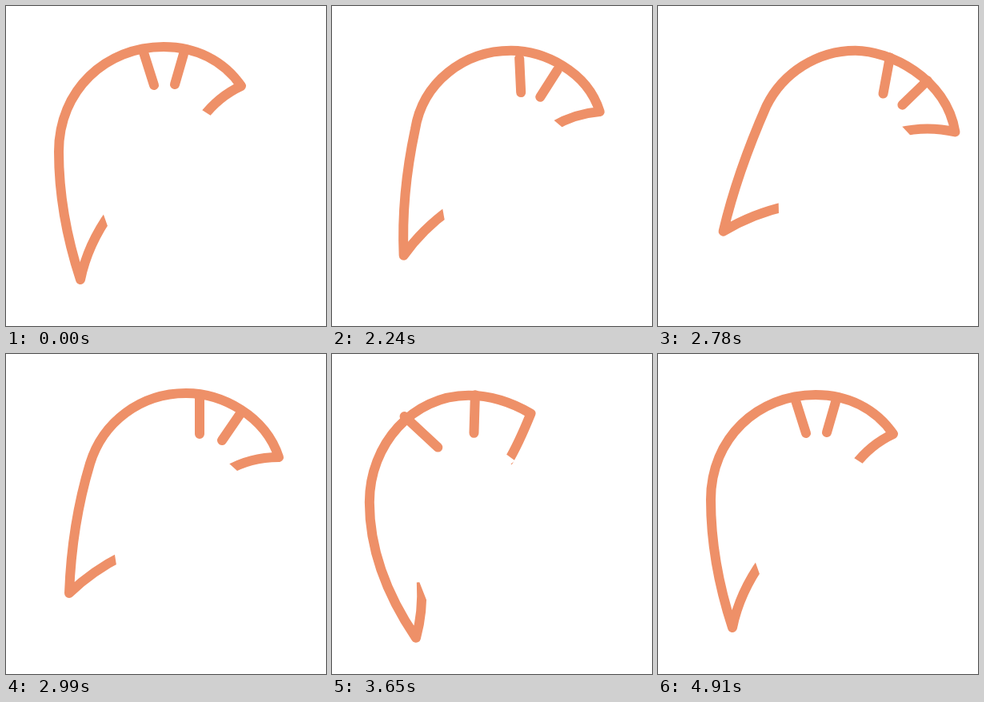
These frames come from a looping animation (400 px wide and 400 px high, 5030 ms). An HTML page with a canvas:

```html
<!DOCTYPE html>
<html lang="en">
<head>
<meta charset="utf-8">
<title>Swinging crest</title>
<style>
  html, body { margin: 0; width: 100%; height: 100%; overflow: hidden; background: #fff; }
  canvas { display: block; }
</style>
</head>
<body>
<canvas id="stage" width="400" height="400"></canvas>
<script>
const ctx = document.getElementById('stage').getContext('2d');
const LOOP = 5030, START = 2030, STEP = 30;

// Each pose: outer curve (10 points), front edge (2), back edge (2),
// two ridges (4), front cut (2), back cut (2).
const rest = [
  93,342, 76,290, 66,235, 66,182, 66,105, 125,51, 197,51, 237,51, 272,68, 294,100,
  266,113, 246,139, 102,298, 131,258,
  172,58, 185,99, 222,60, 211,98,
  245,130, 256,137, 122,261, 127,275];
const forward = [
  86,279, 100,230, 122,175, 145,125, 165,85, 208,61, 253,61, 292,61, 370,94, 379,167,
  345,158, 309,163, 125,258, 166,250,
  302,74, 292,118, 347,102, 314,131,
  313,157, 323,168, 156,246, 156,260];
const halfway = [
  79,299, 81,245, 89,190, 105,137, 121,85, 168,49, 225,49, 270,49, 324,77, 341,129,
  305,129, 276,146, 108,271, 146,252,
  242,54, 242,100, 294,73, 270,108,
  279,137, 289,146, 136,251, 138,264];
const back = [
  98,344, 72,290, 58,235, 58,180, 58,105, 115,48, 186,48, 222,48, 253,62, 275,86,
  252,110, 235,134, 107,305, 123,266,
  138,63, 163,103, 204,53, 197,95,
  234,125, 243,131, 116,266, 122,282];

const mix = (a, b, k, dy = 0) => a.map((v, i) => v + (b[i] - v) * k + (i % 2) * dy);

const keys = [
  [2000, rest],
  [2450, forward],
  [2560, mix(rest, forward, 1.09)],
  [2990, halfway],
  [3230, back],
  [3635, mix(rest, back, 2.4, 8)],
  [4040, mix(rest, back, 0.68, 2)],
  [4160, mix(rest, back, 0.23, 1)],
  [4370, mix(rest, back, -0.13)],
  [4900, rest]
];

// Monotone cubic interpolation: turning points get a flat tangent.
const slope = (i, c) => (keys[i + 1][1][c] - keys[i][1][c]) / (keys[i + 1][0] - keys[i][0]);

function tangent(i, c) {
  if (i === 0 || i === keys.length - 1) return 0;
  const a = slope(i - 1, c), b = slope(i, c);
  return a * b > 0 ? 2 * a * b / (a + b) : 0;
}

function poseAt(t) {
  if (t < START || t >= keys[keys.length - 1][0]) return rest;
  const i = keys.findIndex(k => k[0] > t) - 1;
  const [t0, p0] = keys[i], [t1, p1] = keys[i + 1];
  const h = t1 - t0, u = (t - t0) / h, u2 = u * u, u3 = u2 * u;
  const s = 3 * u2 - 2 * u3;
  return p0.map((v, c) => v + (p1[c] - v) * s
    + h * ((u3 - 2 * u2 + u) * tangent(i, c) + (u3 - u2) * tangent(i + 1, c)));
}

function draw(p) {
  const pt = (i, n = 1) => p.slice(2 * i, 2 * (i + n));
  ctx.fillStyle = '#fff';
  ctx.fillRect(0, 0, 400, 400);
  ctx.strokeStyle = '#ee9068';
  ctx.lineWidth = 12;
  ctx.lineJoin = 'round';

  ctx.lineCap = 'butt';
  ctx.beginPath();
  ctx.moveTo(...pt(13));
  ctx.quadraticCurveTo(...pt(12), ...pt(0));
  for (const i of [1, 4, 7]) ctx.bezierCurveTo(...pt(i, 3));
  ctx.quadraticCurveTo(...pt(10, 2));
  ctx.stroke();

  ctx.lineCap = 'round';
  ctx.beginPath();
  for (const i of [14, 16]) {
    ctx.moveTo(...pt(i));
    ctx.lineTo(...pt(i + 1));
  }
  ctx.stroke();

  cover(pt(18, 2), -14, 12);
  cover(pt(20, 2), 24, 0);
}

// White helmet edge that trims the end of a line.
function cover([x0, y0, x1, y1], dx, dy) {
  const ex = (x1 - x0) * 0.6, ey = (y1 - y0) * 0.6;
  ctx.beginPath();
  ctx.moveTo(x0 - ex, y0 - ey);
  ctx.lineTo(x1 + ex, y1 + ey);
  ctx.lineTo(x1 + ex + dx, y1 + ey + dy);
  ctx.lineTo(x0 - ex + dx, y0 - ey + dy);
  ctx.fill();
}

const begin = performance.now();
function frame() {
  const t = (performance.now() - begin) % LOOP;
  draw(poseAt(START + Math.floor((t - START) / STEP) * STEP));
  requestAnimationFrame(frame);
}
frame();
</script>
</body>
</html>
```
